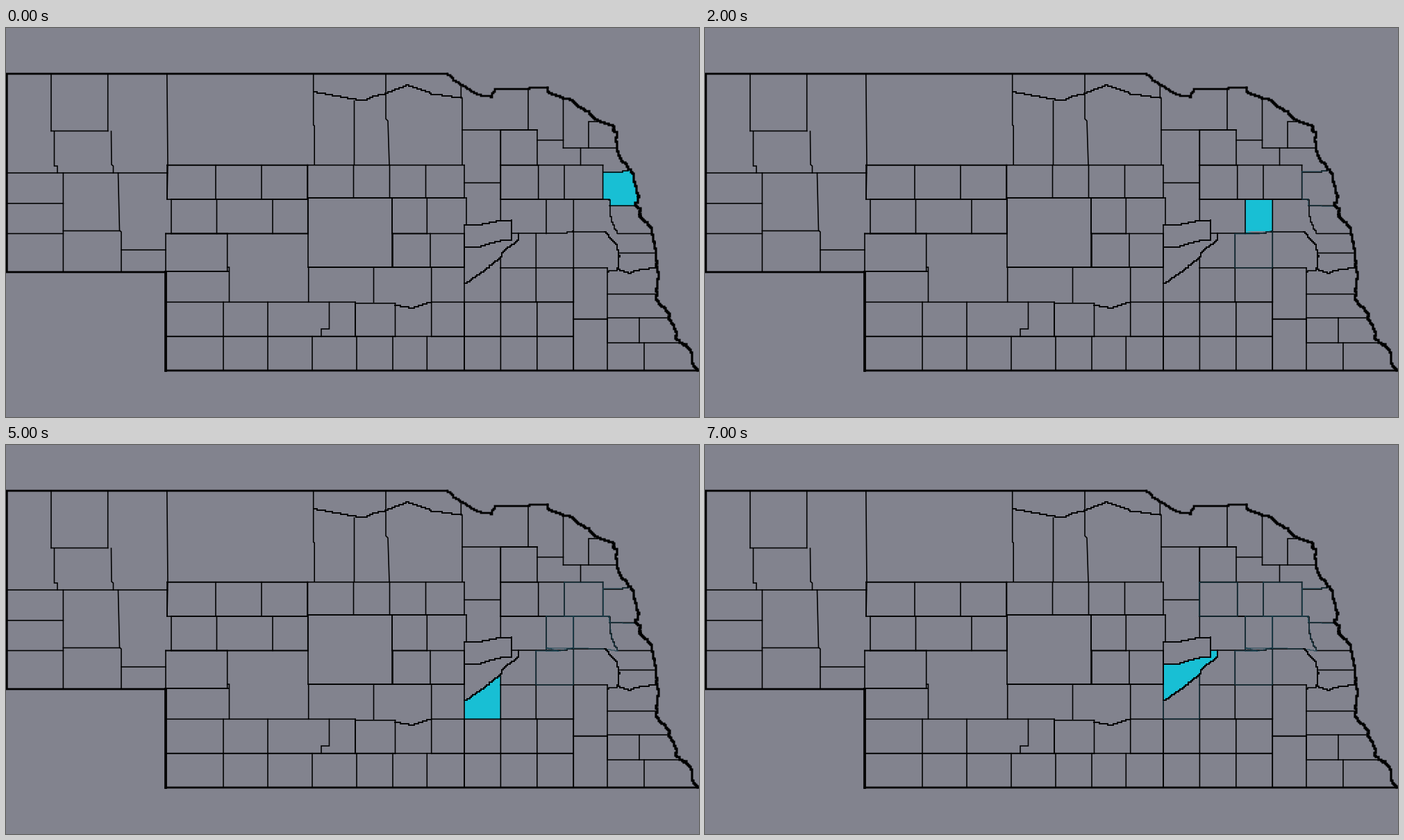
Animation of 998 by 561 pixels, one loop 8 s. Source, as a matplotlib script:

```python
import numpy as np
import matplotlib.pyplot as plt
from matplotlib.animation import FuncAnimation
from matplotlib.collections import LineCollection

W, H, DPI = 998, 561, 100
GREY, CYAN, TINT = "#82838e", "#18bfd4", "#1b4250"

fig = plt.figure(figsize=(W / DPI, H / DPI), dpi=DPI, facecolor=GREY)
ax = fig.add_axes([0, 0, 1, 1])
ax.set_xlim(0, W)
ax.set_ylim(H, 0)
ax.axis("off")
rng = np.random.default_rng(4)

# Survey grid that most southern and eastern counties follow
ROW = [197.7 + 49.4 * k for k in range(7)]
COL = [660 + 52.4 * k for k in range(4)]
TOP, BOTTOM, LEFT, NOTCH, PANHANDLE = 66, 494, 1.3, 230, 352
lines = []


def across(y, x0, x1):
    lines.append([(x0, y), (x1, y)])


def down(top, bottom, *xs):
    lines.extend([(x, top), (x, bottom)] for x in xs)


def strip(top, bottom, *xs):
    """A row of box counties side by side."""
    across(top, xs[0], xs[-1])
    across(bottom, xs[0], xs[-1])
    down(top, bottom, *xs)


def box(x0, y0, x1, y1):
    return [(x0, y0), (x1, y0), (x1, y1), (x0, y1)]


def stairs(points, wobble=0, step=2):
    """Turn a polyline into a blocky path on a coarse grid."""
    out = []
    for p, q in zip(points, points[1:]):
        p, q = np.array(p), np.array(q)
        n = int(np.abs(q - p).max() / step) + 1
        drift = rng.normal(0, wobble, (n // 3 + 2, 2))
        drift[0] = drift[-1] = 0
        for t in np.linspace(0, 1, n + 1):
            sway = drift[int(t * (len(drift) - 1))]
            x, y = step * np.round((p + (q - p) * t + sway) / step)
            if out and x != out[-1][0] and y != out[-1][1]:
                out.append((x, out[-1][1]))
            out.append((x, y))
    return out


def draw(paths, width, color="black", z=2):
    return ax.add_collection(LineCollection(
        paths, colors=color, linewidths=width * 72 / DPI, zorder=z,
        capstyle="projecting", joinstyle="miter", snap=False))


# Panhandle
strip(TOP, 148.5, 65, 146.7)
lines.append([(69.5, 149), (69.5, 199), (74, 199), (74, 209)])
lines.append([(151.5, 149), (152, 197), (154.5, 199), (154.5, 209)])
lines.append([(161.5, 209), (163.5, 292), (166, 294), (166, PANHANDLE)])
across(209, LEFT, 232.5)
for y in (253, ROW[2]):
    across(y, LEFT, 82.4)
down(209, PANHANDLE, 82.4)
across(292.5, 82.4, 164)
across(320, 166, NOTCH)

# Northern counties
lines.append([(231.8, TOP), (233, 197), (232, ROW[1])])
lines.append([(442.7, TOP), (442.7, 140), (444.2, 141), (444.2, 197)])
lines.append([(547, TOP), (547, 131), (550, 134), (552, 197)])
down(105, 197, 501.5)
down(82, 101, 655.3)
down(101, 197, 657)
across(ROW[0], 232, 434.5)

# Central counties
strip(ROW[0], ROW[1], 232, *np.arange(302, 435, 66))
strip(ROW[0], 245, *np.arange(434.5, 605, 66)[:2], 552.5, 604.5, 660)
strip(ROW[1], ROW[2], 238, 303.5, 384, 434.7)
strip(245, 345, 435, 556)
strip(245, ROW[2], 556, 606.3)
strip(ROW[2], 345, 557, 611, 660)
across(245, 606, 663)
down(245, 284, 663)
across(ROW[2], NOTCH, 435)
strip(ROW[2], 351, NOTCH, 318.7)
lines.append([(318.7, 345), (321.5, 345), (321.5, ROW[4])])
across(351, NOTCH, 321)
across(345, 436, 660)
down(345, ROW[4], 435.7, 529.5, 612.7)

# Two southern rows
strip(ROW[4], ROW[5], NOTCH, 313, 377, 503)
strip(397, ROW[5], 503, 560.5)
strip(ROW[4], ROW[5], 612.7, *COL)
strip(ROW[5], BOTTOM, NOTCH, *range(313, 506, 64), 557, 606.3, *COL)
lines.append([(465.5, ROW[4]), (465.5, 434), (454, 434), (454, ROW[5])])

# Eastern counties
across(147, 657, 765)
strip(147, ROW[0], 712.3, 765)
down(147, 278, 712.3)
down(284, BOTTOM, 660)
across(223.3, 660, 712)
down(87, 147, 752)
across(161.7, 765, 802.5)
down(100, 173, 802.5)
across(173, 802.5, 880)
lines.append([(852, 135), (839, 135), (839, 173)])
down(173, ROW[0], 827.5)
strip(ROW[0], ROW[1], 712.3, 766.7, 804, 859.6)
across(ROW[1], 712.3, 869)
down(ROW[1], ROW[2], 778)
down(ROW[1], ROW[3], 817.3)
across(256.3, 869, 907)
across(ROW[2], 881, 930)
across(324.5, 883, 934)
down(ROW[2], ROW[3], 763.3)
down(331, ROW[3], 712.3)
strip(ROW[3], ROW[4], 712.3, 763.3, 817.3)
strip(ROW[3], 419.7, 817.3, 866)
strip(419.7, BOTTOM, 817.3, 866)
across(383.7, 866, 936)
strip(418, 454, 866, 912)
across(418, 912, 952)
across(454, 912, 974)
down(454, BOTTOM, 919)

# Rivers
niobrara = [(443, 92), (514, 105), (530, 98), (545, 95), (577, 82),
            (613, 95), (656, 101)]
missouri_north = [(635, 66), (645, 75), (667, 90), (682, 97), (698, 99),
                  (705, 87), (752, 87), (780, 86)]
missouri = [(780, 86), (782, 94), (815, 105), (850, 133), (876, 142),
            (882, 184), (903, 210), (911, 243), (907, 257), (914, 262),
            (913, 272), (929, 288), (936, 320), (935, 332), (940, 358),
            (936, 392), (950, 407), (964, 437), (965, 448), (981, 461),
            (989, 472), (988, 484), (996, 494)]
platte_west = [(660, 369), (682, 354), (712, 331), (715, 323), (738, 305),
               (738, 297)]
platte_mid = [(738, 297), (796, 297), (815, 293), (862, 294)]
platte_east = [(862, 294), (879, 313), (883, 330), (881, 348), (897, 354),
               (905, 350), (937, 345)]
loup_north = [(660, 285), (680, 284), (710, 278), (727, 277), (727, 306)]
loup_south = [(660, 316), (682, 315), (710, 307), (727, 306)]
elkhorn = [(869, 247), (871, 273), (874, 284), (881, 297)]
republican = [(560, 400), (585, 404), (612, 395)]
creek = [(860, 207), (886, 207), (897, 205)]

draw(lines, 1.6)
draw([stairs(r) for r in (platte_mid, elkhorn, creek, [(866, 351), (881, 349)],
                          [(727, 297), (738, 297)])], 1.6)
draw([stairs(r) for r in (niobrara, loup_north, loup_south, republican,
                          platte_west, platte_east)], 1.9, z=4)
draw([[(635, TOP), (LEFT, TOP), (LEFT, PANHANDLE), (NOTCH, PANHANDLE)],
      [(NOTCH, BOTTOM), (W, BOTTOM)], stairs(missouri_north)], 2.8, z=4)
draw([[(NOTCH, PANHANDLE), (NOTCH, BOTTOM)]], 3.8, z=4)
draw([stairs(missouri, wobble=0.8)], 3.2, z=4)

# Counties in the order they light up
counties = [
    creek + missouri[6:9] + [(869, 256), (869, 247), (860, 247)],
    [(763, 297)] + platte_mid[1:3] + [(817, 293), (817, 346), (763, 346)],
    box(778, 247, 817, 293) + [(796, 297), (778, 297)],
    box(804, ROW[0], 859.6, ROW[1]),
    [(817, 247)] + elkhorn + [(862, 294), (817, 293)],
    platte_west[:3] + [(712, ROW[4]), (660, ROW[4])],
    box(712.3, ROW[0], 766.7, ROW[1]),
    loup_south + [(727, 297)] + platte_west[::-1],
]
fills = [ax.fill(*zip(*c), color=CYAN, lw=0, zorder=1)[0] for c in counties]
# A lit county leaves its thin borders slightly tinted
tints = [draw([stairs(c + c[:1], step=1)], 1, TINT, z=3) for c in counties]


def update(i):
    for k, (fill, tint) in enumerate(zip(fills, tints)):
        fill.set_visible(k == i)
        tint.set_visible(k < i)
    return fills + tints


anim = FuncAnimation(fig, update, frames=len(counties), interval=1000,
                     repeat=True, blit=False)
plt.show()
```
